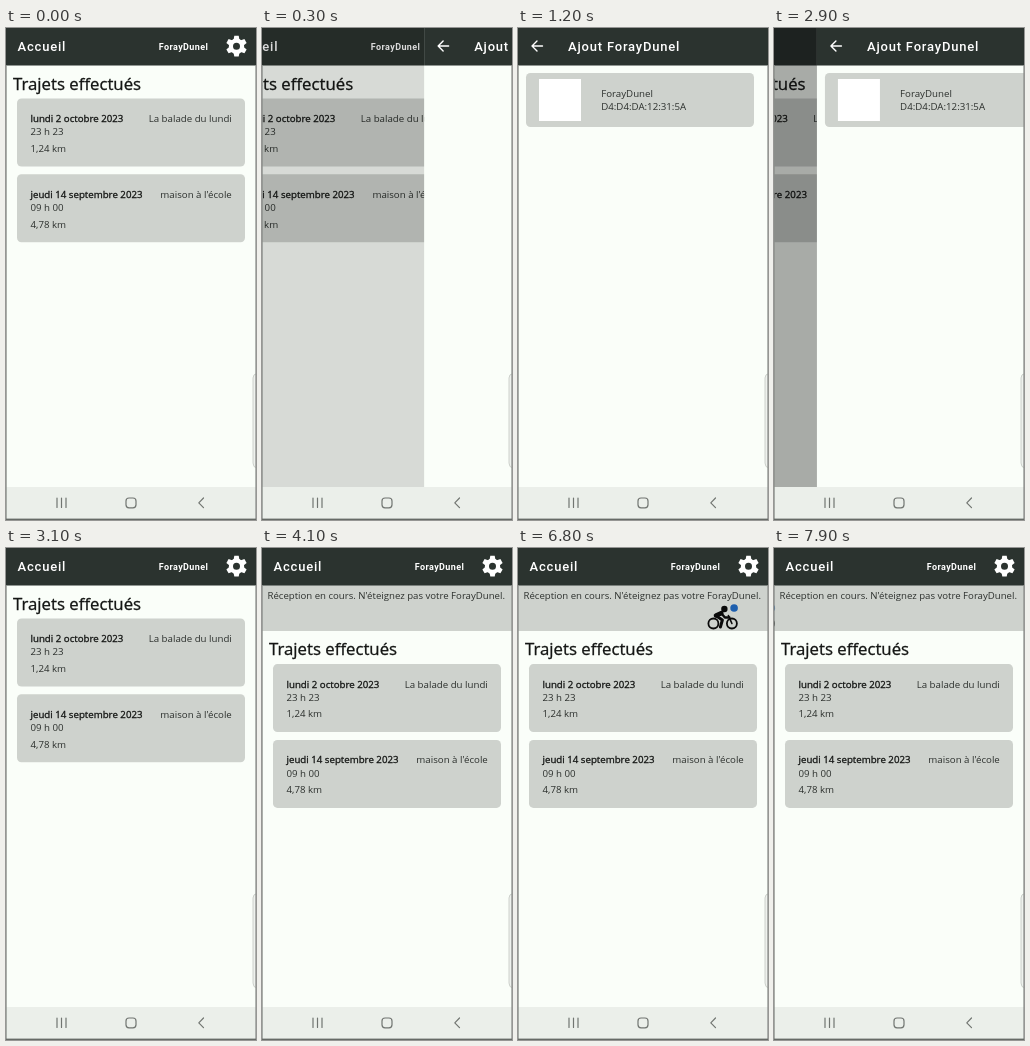
Animation, 250 px wide and 492 px high, one loop 8 s. Source, as an HTML page:

```html
<!DOCTYPE html>
<html lang="fr">
<head>
<meta charset="utf-8">
<title>Trajets</title>
<style>
html, body { margin: 0; width: 100%; height: 100%; overflow: hidden; background: #fafef9; }
svg { display: block; width: 100vw; height: 100vh; }
text { font: 9.7px "Open Sans", "Noto Sans", sans-serif; fill: #2c302d; white-space: pre; }
.strong { fill: #141614; stroke: #141614; stroke-width: .3; }
.heading { font-size: 16.8px; }
.title { font: 500 13px Roboto, sans-serif; letter-spacing: .8px; fill: #fff; }
.action { font: 700 9px Roboto, sans-serif; letter-spacing: .4px; fill: #fff; text-anchor: middle; }
.end { text-anchor: end; }
.panel { fill: #ced2cd; }
.page { fill: #fafef9; }
.bar { fill: #2b332f; }
.line { fill: none; stroke-linecap: round; stroke-linejoin: round; }
</style>
</head>
<body>
<svg viewBox="0 0 250 492">
  <defs>
    <filter id="soft" x="-50%" y="-50%" width="200%" height="200%">
      <feDropShadow dx="0" dy=".6" stdDeviation="1" flood-color="#000" flood-opacity=".3"/>
    </filter>
  </defs>

  <g id="home">
    <rect class="page" width="250" height="460"/>
    <g id="banner">
      <rect class="panel" y="37" width="250" height="46"/>
      <text x="5.5" y="51.2" style="font-size:9.62px">Réception en cours. N'éteignez pas votre ForayDunel.</text>
      <g id="bike">
        <g class="line" stroke="#0a0a0a">
          <circle cx="-7" cy="75.5" r="5" stroke-width="1.8"/>
          <circle cx="11.5" cy="75.5" r="5" stroke-width="1.8"/>
          <path d="M11.5 75.5L8 67.5" stroke-width="1.6"/>
          <path d="M-4 68L1.5 66L4.5 69.5H9" stroke-width="2.4"/>
          <path d="M-4 68L2 72L0 79" stroke-width="3"/>
          <path d="M-4.5 67.5L1 65" stroke-width="4.4"/>
        </g>
        <circle cx="4" cy="61" r="3.2" fill="#0a0a0a"/>
        <circle cx="13.7" cy="60" r="3.8" fill="#1d5fae"/>
      </g>
    </g>
    <g id="trips">
      <text class="strong heading" x="7" y="61.7">Trajets effectués</text>
    </g>
    <rect class="bar" width="250" height="37.5"/>
    <text class="title" x="11.5" y="23">Accueil</text>
    <text class="action" x="177.5" y="22">ForayDunel</text>
    <g id="gear" transform="translate(230.5 18.2)" fill="#fff"></g>
  </g>

  <rect id="dim" width="250" height="460" fill="#000"/>

  <g id="add">
    <rect class="page" width="250" height="460"/>
    <rect class="bar" width="250" height="37.5"/>
    <path class="line" d="M24.5 18H14M19 13L14 18L19 23" stroke="#fff" stroke-width="1.4"/>
    <text class="title" x="50" y="23">Ajout ForayDunel</text>
    <g id="device">
      <rect class="panel" x="8" y="45" width="228" height="54" rx="4.5"/>
      <rect x="21" y="51" width="42" height="42" fill="#fff"/>
      <text x="83.2" y="69">ForayDunel</text>
      <text x="83.2" y="82.2">D4:D4:DA:12:31:5A</text>
    </g>
    <g id="spinner">
      <circle r="9" fill="#f9fbf8" filter="url(#soft)"/>
      <path id="arc" class="line" stroke="#3a403c" stroke-width="1.3" d="M0 -4.4A4.4 4.4 0 1 1 -4.4 0"/>
    </g>
  </g>

  <g id="system">
    <rect y="459" width="250" height="33" fill="#ebefea"/>
    <g class="line" stroke="#717571" stroke-width="1.2">
      <path d="M51 470V479.5M55.5 470V479.5M60 470V479.5"/>
      <rect x="120" y="470" width="10" height="9.8" rx="3"/>
      <path d="M197.5 470L192.8 474.8L197.5 479.6"/>
    </g>
    <path d="M251 345.5Q247 346 247 350V435Q247 439.5 251 440" fill="#eff2ee" stroke="#c3c7c2" stroke-width=".8"/>
    <path d="M.4 37V492M249.7 37V492" stroke="#8b8f8b" stroke-width=".8"/>
    <rect y="490.6" width="250" height="1.4" fill="#666a66"/>
  </g>
</svg>
<script>
const LOOP = 8000, W = 250;
const $ = id => document.getElementById(id);
const clamp = u => Math.min(1, Math.max(0, u));
const sineInOut = u => (1 - Math.cos(Math.PI * clamp(u))) / 2;
const cubicInOut = u => u < .5 ? 4 * u ** 3 : 1 - 4 * (1 - u) ** 3;
const show = (id, on) => $(id).setAttribute("display", on ? "inline" : "none");
const move = (id, x, y = 0, rest = "") => $(id).setAttribute("transform", `translate(${x} ${y}) ${rest}`);

function tripCard(y, date, name, hour, km) {
  return `<rect class="panel" x="11" y="${y}" width="228" height="68" rx="4.5"/>
    <text class="strong" x="24.5" y="${y + 23.6}">${date}</text>
    <text class="end" x="225.8" y="${y + 23.6}">${name}</text>
    <text x="24.5" y="${y + 36.8}">${hour}</text>
    <text x="24.5" y="${y + 53.3}">${km}</text>`;
}

$("trips").innerHTML += tripCard(70.5, "lundi 2 octobre 2023", "La balade du lundi", "23 h 23", "1,24 km")
  + tripCard(146.3, "jeudi 14 septembre 2023", "maison à l'école", "09 h 00", "4,78 km");

const tooth = a => `<path d="M-3 -6L-2.2 -10.4H2.2L3 -6Z" transform="rotate(${a})"/>`;
$("gear").innerHTML = [0, 60, 120, 180, 240, 300].map(tooth).join("")
  + '<circle r="5.6" fill="none" stroke="#fff" stroke-width="4.2"/>';

// Share of the second page that covers the home page
const cover = t => sineInOut((t - 200) / 250) - sineInOut((t - 2833) / 250);

function drawPages(t) {
  const p = cover(t);
  show("add", p > 0);
  move("add", W * (1 - p));
  move("home", -W * p / 2);
  $("dim").setAttribute("opacity", .4 * p);
  show("device", t >= 1000);
  const scale = clamp((t - 250) / 120) * clamp((1100 - t) / 100);
  show("spinner", scale > 0);
  move("spinner", 121, 67.5, `scale(${scale})`);
  $("arc").setAttribute("transform", `rotate(${t * .5})`);
  $("arc").setAttribute("opacity", clamp((t - 420) / 100));
}

function drawBanner(t) {
  const on = t >= 3400;
  show("banner", on);
  move("trips", 0, on ? 45.6 : 0);
  show("bike", t >= 4900);
  const ride = (t - 4900) % 2800;
  move("bike", -16.4 + 320 * cubicInOut(clamp((ride - 361) / 2698)));
}

function draw(t) {
  drawPages(t);
  drawBanner(t);
}

const start = performance.now();
function tick() {
  draw((performance.now() - start) % LOOP);
  requestAnimationFrame(tick);
}
tick();
</script>
</body>
</html>
```
